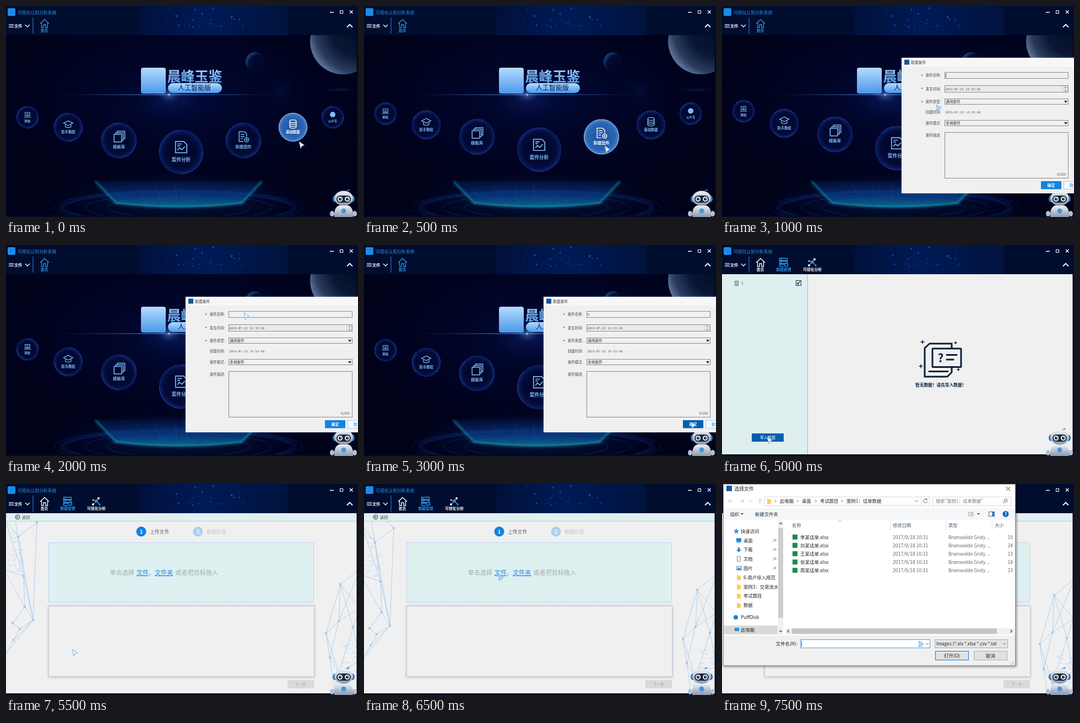
Write an HTML page that moves like this. It is 639 px wide and 383 px high and loops after 8 s.

```html
<!DOCTYPE html>
<html lang="zh-CN">
<head>
<meta charset="utf-8">
<title>可视化认知分析系统</title>
<style>
html, body { margin: 0; width: 100%; height: 100%; overflow: hidden; background: #000a22; }
svg { display: block; width: 639px; height: 383px; font-family: "Noto Sans CJK SC", "Noto Sans CJK", "Noto Sans", sans-serif; }
.mono { font-family: "Noto Sans Mono", "Liberation Mono", monospace; }
.a { animation: 8s step-end infinite; }
.home { animation-name: home; }
.work { animation-name: work; }
.data { animation-name: data; }
.upload { animation-name: upload; }
.case { animation-name: case; }
.files { animation-name: files; }
.hover0 { animation-name: hover0; }
.hover1 { animation-name: hover1; }
.bob { animation-name: bob; }
.caret { animation-name: caret; }
.typed { animation-name: typed; }
.okBtn { animation-name: okBtn; }
.importBtn { animation-name: importBtn; }
.cursor { animation-name: cursor; }
.arrow { animation-name: arrow; }
.busy { animation-name: busy; }
.spin { animation: spin 8s steps(16) infinite; }
.drift { animation: drift 8s steps(16) infinite; }
@keyframes home { 0% { opacity: 1 } 43.75%, 100% { opacity: 0 } }
@keyframes work { 0% { opacity: 0 } 43.75%, 100% { opacity: 1 } }
@keyframes data { 0% { opacity: 0 } 43.75% { opacity: 1 } 68.75%, 100% { opacity: 0 } }
@keyframes upload { 0% { opacity: 0 } 68.75%, 100% { opacity: 1 } }
@keyframes case {
  0% { opacity: 0; transform: none }
  12.5% { opacity: 1; transform: none }
  43.75% { opacity: .68; transform: translate(4px, 2px) scale(.993) }
  50%, 100% { opacity: 0; transform: none }
}
@keyframes files { 0% { opacity: 0 } 87.5%, 100% { opacity: 1 } }
@keyframes hover0 { 0% { opacity: 1 } 6.25%, 100% { opacity: 0 } }
@keyframes hover1 { 0% { opacity: 0 } 6.25% { opacity: 1 } 12.5%, 100% { opacity: 0 } }
@keyframes bob {
  0% { transform: none }
  6.25% { transform: translateY(calc(var(--a) * -.6)) }
  12.5% { transform: translateY(calc(var(--a) * -1)) }
  18.75% { transform: translateY(calc(var(--a) * -1.1)) }
  25% { transform: translateY(calc(var(--a) * -1.15)) }
  31.25% { transform: translateY(calc(var(--a) * -1.1)) }
  37.5%, 100% { transform: translateY(calc(var(--a) * -1)) }
}
@keyframes caret { 0% { opacity: 1 } 25%, 100% { opacity: 0 } }
@keyframes typed { 0% { opacity: 0 } 31.25%, 100% { opacity: 1 } }
@keyframes okBtn { 0% { fill: #1283e2 } 37.5% { fill: #0060b0 } 43.75%, 100% { fill: #0a72c0 } }
@keyframes importBtn { 0% { fill: #1283e2 } 56.25%, 100% { fill: #0060b0 } }
@keyframes spin { to { transform: rotate(360deg) } }
@keyframes drift { from { transform: translate(13px, -65px) } to { transform: translate(-3px, 15px) } }
@keyframes cursor {
  0% { transform: translate(532px, 246px) }
  6.25% { transform: translate(437px, 254px) }
  12.5% { transform: translate(388px, 179px) }
  18.75% { transform: translate(432px, 123px) }
  31.25% { transform: translate(617px, 299px) }
  37.5% { transform: translate(593px, 321px) }
  43.75% { transform: translate(597px, 308px) }
  50% { transform: translate(203px, 330px) }
  56.25% { transform: translate(80px, 346px) }
  62.5% { transform: translate(82px, 348px) }
  68.75% { transform: translate(120px, 300px) }
  75% { transform: translate(200px, 200px) }
  81.25% { transform: translate(243px, 164px) }
  87.5% { transform: translate(300px, 240px) }
  93.75%, 100% { transform: translate(356px, 285px) }
}
@keyframes arrow { 0% { opacity: 1 } 12.5% { opacity: 0 } 18.75% { opacity: 1 } 81.25%, 100% { opacity: 0 } }
@keyframes busy { 0% { opacity: 0 } 12.5% { opacity: 1 } 18.75% { opacity: 0 } 81.25%, 100% { opacity: 1 } }
</style>
</head>
<body>
<svg id="stage" viewBox="0 0 639 383"></svg>
<script>
const BLUE = '#1283e2', SKY = '#2a93e8', INK = '#0b2038', MINT = '#dff0f0';

const text = (x, y, size, str, fill, opt = '') =>
  `<text x="${x}" y="${y}" font-size="${size}" fill="${fill}" ${opt}>${str}</text>`;
const rect = (x, y, w, h, fill, opt = '') =>
  `<rect x="${x}" y="${y}" width="${w}" height="${h}" fill="${fill}" ${opt}/>`;
const box = (x, y, w, h, fill, stroke) =>
  rect(x + .5, y + .5, w - 1, h - 1, fill, `stroke="${stroke}"`);
const line = (d, stroke, width = 1, opt = '') =>
  `<path d="${d}" fill="none" stroke="${stroke}" stroke-width="${width}" ${opt}/>`;
const shape = (d, fill, opt = '') => `<path d="${d}" fill="${fill}" ${opt}/>`;
const dot = (x, y, r, fill, opt = '') => `<circle cx="${x}" cy="${y}" r="${r}" fill="${fill}" ${opt}/>`;
const oval = (x, y, rx, ry, fill, opt = '') =>
  `<ellipse cx="${x}" cy="${y}" rx="${rx}" ry="${ry}" fill="${fill}" ${opt}/>`;
const layer = (name, ...parts) => `<g class="a ${name}">${parts.join('')}</g>`;
const repeat = (n, make) => Array.from({ length: n }, (_, i) => make(i)).join('');
const MID = 'text-anchor="middle"', END = 'text-anchor="end"', BOLD = 'font-weight="700"';
const MID_BOLD = MID + ' ' + BOLD;

let seed = 11;
const rnd = () => (seed = seed * 16807 % 2147483647) / 2147483647;
const stops = list => list.map(([o, c, a = 1]) =>
  `<stop offset="${o}" stop-color="${c}" stop-opacity="${a}"/>`).join('');
const radial = (id, list, opt = '') => `<radialGradient id="${id}" ${opt}>${stops(list)}</radialGradient>`;
const linear = (id, list, down = true) =>
  `<linearGradient id="${id}" x2="${down ? 0 : 1}" y2="${down ? 1 : 0}">${stops(list)}</linearGradient>`;

const defs = `<defs>
${radial('space', [[0, '#020a3a'], [.4, '#010528'], [1, '#00021a']], 'cy=".35"')}
${radial('flare', [[0, '#fff'], [.08, '#8fc0ff', .9], [.3, '#2452c8', .4], [1, '#0a1e78', 0]])}
${radial('mist', [[0, '#0c3c90', .4], [1, '#08246c', 0]])}
${radial('ball', [[0, '#010526'], [.75, '#020a36'], [1, '#0a1c62']])}
${radial('lit', [[0, '#1c509c'], [.8, '#2c66b4'], [1, '#4a86cc']])}
${radial('moon', [[0, '#020a22'], [.55, '#0a1734'], [.85, '#2a3c5e'], [1, '#5a7096']], 'cx=".75" cy=".3" r=".8"')}
${radial('moonlet', [[0, '#01062a'], [.75, '#020c34'], [1, '#1c4880']], 'cx=".72" cy=".68" r=".72"')}
${linear('streak', [[0, '#1a4cb0', 0], [.5, '#7aaef0'], [1, '#1a4cb0', 0]], false)}
${linear('brand', [[0, '#b4dcff'], [1, '#4a98ea']])}
${linear('beam', [[0, '#08246c', .25], [.6, '#0a4a9c', .6], [1, '#0f86a4', .75]])}
${linear('band', [[0, '#00103a'], [.45, '#001a56'], [1, '#00133e']], false)}
${linear('shell', [[0, '#eef2f7'], [1, '#8a99ae']])}
<filter id="soft"><feGaussianBlur stdDeviation="2"/></filter>
<clipPath id="page"><rect y="53" width="637" height="327"/></clipPath>
<clipPath id="paper"><rect y="68" width="637" height="312"/></clipPath>
<clipPath id="tree"><rect width="101" height="280"/></clipPath>
</defs>`;

function header() {
  const circuit = repeat(20, () => {
    const x = 290 + rnd() * 140, y = 3 + rnd() * 40, len = 4 + rnd() * 10;
    return line(`M${x},${y}v${len}`, '#0a3c88', .4, 'opacity=".5"') + dot(x, y, .7 + rnd() * .9, '#1c70d0', 'opacity=".7"');
  });
  return rect(0, 0, 639, 53, '#000d2e') + rect(240, 0, 272, 53, 'url(#band)') + circuit +
    line('M321,36L347,20L376,37L404,36', '#0c3f88', .4) +
    rect(3, 4, 14, 14, '#1d8be4', 'rx="2"') + text(21, 14.5, 7.85, '可视化认知分析系统', SKY) +
    line('M5,33.5h9M5,36h9M5,38.5h9', '#fff') + text(15, 39, 7.2, '文件', '#fff', BOLD) +
    line('M35,34l4,4l4,-4', '#fff', 1.3) + line('M49,21V50', '#1d6fc0', 1.3) +
    line('M588,11.5h7M624,8l5.5,5.5m0,-5.5l-5.5,5.5', '#fff', 1.3) +
    box(606, 8, 6, 6, 'none', '#fff') + line('M619,38.5l5,-5l5,5', '#fff', 1.9);
}

const homeTab = color =>
  line('M62,32L70,24.5L78,32M64.5,30.5V39H68V34H72V39H75.5V30.5', color, 1.3) +
  text(69.5, 47, 6.8, '首页', color, MID_BOLD);

const workTabs = homeTab('#fff') +
  line('M104.5,24h14v4h-14zM104.5,29.5h14v4h-14zM112,39h-7.5v-4h8', SKY, 1.3) +
  line('M106,26h3M106,31.5h3', SKY) + dot(116.5, 36, 3, 'none', `stroke="${SKY}" stroke-width="1.6"`) +
  text(112, 47, 6.8, '数据管理', SKY, MID_BOLD) +
  line('M158,37L164,31L168,26M164,31L170,37M164,31L158,29', '#fff', .9) +
  dot(158, 37, 2, '#fff') + dot(168, 26, 2, '#fff') + dot(170, 37, 1.7, SKY) +
  dot(164, 31, 2.8, SKY) + dot(158, 29, 1.2, '#fff') +
  text(164, 47, 6.8, '可视化分析', '#fff', MID_BOLD);

const stack = 'M-9,-4H5V10H-9ZM-6,-4V-7H8V7H5M-3,-7V-10H11V4H8';
const drum = 'M-7,-6A7,3 0 0 1 7,-6A7,3 0 0 1 -7,-6V6A7,3 0 0 0 7,6V-6M-7,-2A7,3 0 0 0 7,-2M-7,2A7,3 0 0 0 7,2';
const balls = [
  [39, 202, 20, 11, '网校', 'M-6,-6H6V3H-6ZM-9,6H9M-3,-2H3M-3,1H3'],
  [113, 220, 26, 7, '新手教程', 'M0,-7L10,-2L0,3L-10,-2ZM-6,1V6Q0,9 6,6V1'],
  [205, 244, 32, 11, '模板库', stack],
  [318, 265, 40, 7, '案件分析', 'M-9,9V-9H4L9,-4V9ZM-6,5L-3,1L1,4L6,-1M-6,-5H1M-6,-2H-2'],
  [431, 244, 32, 11, '新建案件', 'M0,9H-8V-9H2L6,-5V0M-5,-4H2M-5,0H2M-5,4H-1M10,6A4,4 0 1 1 2,6A4,4 0 1 1 10,6M4,6H8M6,4V8', 'hover1'],
  [521, 220, 26, 7, '基础数据', drum, 'hover0'],
  [593, 202, 20, 11, '公众号', ''],
];

function ball([x, y, r, rise, name, icon, hover]) {
  const arc = (q, color, w) => line(`M${-q},0A${q},${q} 0 0 1 0,${-q}M${q},0A${q},${q} 0 0 1 0,${q}`, color, w);
  const face = color => (icon
    ? line(icon, color, 1.5, `transform="translate(0 ${-.22 * r}) scale(${.3 + r * .021})"`)
    : dot(0, -5, 5, color)) + text(0, .43 * r, 2.2 + r * .16, name, color, MID_BOLD);
  const lit = hover ? layer(hover, dot(0, 0, r - .5, 'url(#lit)', 'stroke="#a9c6ea"'), face('#fff')) : '';
  return `<g transform="translate(${x} ${y})"><g class="a bob" style="--a:${rise}px">` +
    dot(0, 0, r, 'url(#ball)', 'stroke="#10267a" stroke-width=".7"') +
    `<g class="spin" opacity=".55">${arc(r - .5, '#4a72d0', .7)}${arc(r - 3, '#1c3c98', .5)}</g>` +
    dot(0, 0, r - 2, 'none', 'stroke="#2444a0" stroke-dasharray=".6 2" opacity=".5"') +
    face('#7cbcf8') + lit + '</g></g>';
}

function stand() {
  const rays = repeat(26, i =>
    line(`M${204 + i * 8.8},362L${164 + i * 12},${322 + rnd() * 22}`, i % 3 ? '#1460c0' : '#17a09a', .7, 'opacity=".3"'));
  const rings = [225, 205, 170, 130].map((rx, i) =>
    oval(313, 366, rx, rx * .14, 'none', `stroke="#12388e" opacity="${.45 + i * .05}"`)).join('');
  return oval(313, 350, 225, 50, 'url(#mist)') + rings +
    oval(313, 366, 212, 29, 'none', 'stroke="#1238a0" stroke-width="4" opacity=".35" filter="url(#soft)"') +
    shape('M161,317H466L428,358Q313,372 200,358Z', 'url(#beam)') + rays +
    line('M163,319L200,358Q313,372 428,358L464,319', '#12a0b0', 3, 'filter="url(#soft)" opacity=".7"') +
    line('M161,317L200,358Q313,372 428,358L466,317', '#1c80c0', .7, 'opacity=".8"');
}

function home() {
  const stars = repeat(110, () =>
    dot(rnd() * 636, 55 + rnd() * 250, .3 + rnd() * .5, '#2c5cb8', `opacity="${.15 + rnd() * .5}"`));
  return homeTab(SKY) + '<g clip-path="url(#page)">' + rect(0, 53, 637, 327, 'url(#space)') + stars +
    oval(605, 152, 34, 4, 'url(#mist)') + dot(500, 152, 30, 'url(#mist)', 'opacity=".35"') +
    dot(612, 64, 60, 'url(#moon)') + dot(452, 101, 17, 'url(#moonlet)', 'opacity=".8"') + stand() +
    oval(296, 161, 70, 50, 'url(#flare)', 'opacity=".32"') + oval(296, 161, 230, .8, 'url(#streak)', 'opacity=".7"') +
    dot(296, 161, 10, 'url(#flare)') +
    rect(245, 112, 45, 47, 'url(#brand)', 'rx="4"') +
    text(292.5, 136.5, 25, '晨峰玉鉴', 'url(#brand)', 'font-weight="900"') +
    rect(294, 140, 98, 18, 'url(#brand)', 'rx="9"') + text(342, 153.3, 12, '人工智能版', '#041448', MID) +
    balls.map(ball).join('') + '</g>';
}

const page = workTabs + rect(0, 53, 637, 327, '#f0f0f0');
const plus = (x, y, s) => line(`M${x - s},${y}h${2 * s}M${x},${y - s}v${2 * s}`, INK, 1.5);

const dataPage = rect(0, 53, 155, 327, '#dfeff0') + line('M155.5,53V380', '#a3b6b8') +
  box(23, 65, 7, 9, '#cfdcdc', '#5c6870') + line('M25,68h3M25,70h3M25,72h3', '#5c6870', .7) +
  text(35, 71.5, 6.5, '8', '#777', 'class="mono"') +
  box(134, 64, 10, 10, 'none', '#17283c') + line('M142,66l-5,5M137,68v3h3', '#17283c', 1.2) +
  rect(54, 342, 58, 15, BLUE, 'class="a importBtn"') + text(83, 352.3, 7, '导入数据', '#fff', MID) +
  line('M417,187V179H377L368,187V239H409L417,231V222', INK, 3) +
  rect(382, 188, 52, 33.5, '#f0f0f0', `stroke="${INK}" stroke-width="3" rx="1"`) +
  text(397, 213, 21, '?', INK, MID_BOLD) +
  line('M408,199.5H426M408,208H420M376,229.5H410', INK, 3, 'stroke-linecap="round"') +
  plus(364, 176, 3.5) + plus(424, 177.5, 2.5) + plus(361, 220, 3.5) + plus(429, 226, 2.5) +
  text(351, 257.3, 7.7, '暂无数据！请先导入数据！', INK, BOLD);

function net(points, edges) {
  const wires = edges.map(([a, b]) => `M${points[a]}L${points[b]}`).join('');
  return line(wires, '#a9cdf0', .9) + points.map(([x, y]) => dot(x, y, 2.3, '#a4caf0')).join('');
}

function uploadPage() {
  const left = net([[-4, 74], [20, 106], [54, 80], [47, 257], [30, 177], [32, 233], [10, 262], [23, 273], [12, 293], [-5, 322], [-6, 165], [8, 40]],
    [[0, 1], [1, 2], [2, 3], [1, 3], [1, 4], [4, 3], [4, 5], [5, 3], [5, 6], [3, 7], [6, 7], [7, 8], [3, 8], [8, 9], [0, 4], [10, 4], [10, 5], [11, 2], [11, 1], [9, 3]]);
  const right = net([[605, 192], [602, 259], [579, 281], [628, 270], [642, 162], [640, 235], [586, 325], [602, 352], [640, 330], [594, 384]],
    [[0, 1], [0, 2], [0, 3], [0, 4], [4, 1], [0, 5], [1, 2], [1, 5], [3, 5], [2, 6], [1, 6], [3, 7], [6, 7], [3, 8], [7, 8], [2, 7], [6, 9], [7, 9]]);
  const dashes = repeat(70, () => {
    const side = rnd() < .6, x = side ? rnd() * 28 : 606 + rnd() * 30;
    return line(`M${x},${(side ? 95 : 290) + rnd() * 75}h${2 + rnd() * 6}`, '#c2dcf5', 1.2);
  });
  const link = (x, str) => text(x, 165, 11.1, str, '#2684e4', 'text-decoration="underline"');
  const step = (x, n, str, fill, ink) => dot(x, 86.3, 9, fill) +
    text(x, 89.7, 9.5, n, '#fff', MID_BOLD) + text(x + 15.5, 89.7, 8.8, str, ink);
  return rect(0, 53, 637, 327, '#f0f0f0') +
    `<g clip-path="url(#paper)"><g class="drift">${dashes}${left}${right}</g></g>` +
    rect(0, 53, 637, 14, MINT) + line('M0,67.5H637', '#b4cdea') +
    dot(21, 60, 4, 'none', 'stroke="#333"') + line('M23.5,60H19M21,58l-2,2l2,2', '#333', .9) + text(29, 62.8, 7.2, '返回', '#444') +
    step(245.5, 1, '上传文件', BLUE, '#666') + step(348.5, 2, '数据处理', '#abd1f3', '#c6c6c6') +
    rect(77.5, 106.5, 481, 108, MINT, 'stroke="#a5c8f8" stroke-dasharray="2 1"') +
    text(188.5, 165, 11.1, '单击选择', '#a2a8aa') + link(237, '文件') + text(259, 165, 11.1, '、', '#2684e4') +
    link(270, '文件夹') + text(307.5, 165, 11.1, '或者把目标拖入', '#a2a8aa') +
    rect(77, 221, 483, 130, '#9a9ac0', 'filter="url(#soft)" opacity=".6"') + box(77, 221, 483, 129, '#f0f0f0', '#c6c8d6') +
    rect(511, 356, 48, 15, '#dadada') + text(535, 366, 6.6, '下一步', '#a0a0a0', MID);
}

const robot = '<g>' + line('M616,338Q618,333 622,334', '#4a6a90') + dot(622, 334, 1.5, SKY) +
  oval(592, 377, 4, 5, '#b4c0d0') + oval(633, 377, 4, 5, '#b4c0d0') +
  shape('M596,383Q595,365 605,362H621Q631,365 630,383Z', 'url(#shell)') +
  oval(597, 350, 4, 6, '#2a78c0') + oval(629, 350, 4, 6, '#2a78c0') +
  oval(613, 349, 17, 13.5, 'url(#shell)') + rect(600, 344, 26, 13, '#1c2636', 'rx="6.5"') +
  [606.5, 619.5].map(x => dot(x, 350.5, 4.5, '#fff') + dot(x, 350.5, 2.7, '#16304c') + dot(x + .8, 349.7, .9, '#8fd0ff')).join('') +
  dot(613, 372, 4.5, '#4a94dc') + '</g>';

function caseDialog() {
  const label = (y, str, must) => text(397.5, y, 6.5, str + ':', '#444', END) +
    (must ? text(361, y + 1.5, 8, '*', '#e05018', BOLD) : '');
  const field = (y, h, fill = '#f0f0f0') => box(404, y, 225, h, fill, '#8a8a94');
  const combo = (y, str) => field(y, 11) + text(406, y + 8, 6.7, str, '#333') + shape(`M621,${y + 4}h6l-3,4z`, '#223');
  const date = y => text(405, y, 5.65, '2019-07-25 14:53:48', '#555', 'class="mono"');
  return rect(326, 94, 314, 246, '#8cc4f4', 'filter="url(#soft)" opacity=".3"') + rect(326, 94, 314, 246, '#f0f0f0') +
    rect(326, 94, 314, 16, '#f7f7f7') + rect(331, 97.5, 9, 9, '#14559c') + text(343, 105, 6.8, '新建案件', '#333') +
    label(128, '案件名称', 1) + field(120, 12) + line('M406.5,122v8', '#222', .8, 'class="a caret"') +
    text(405.5, 128.3, 6, '8', '#555', 'class="a typed mono"') +
    label(152.5, '发生时间', 1) + field(144, 13, '#eaeaea') + date(152.8) + box(618, 145, 10, 11, '#ededed', '#ccc') +
    shape('M621.5,149h4l-2,-2zM621.5,152.5h4l-2,2z', '#555') +
    label(176, '案件类型', 1) + combo(168, '通用案件') + label(195, '创建时间') + date(195) +
    label(215, '案件模式') + combo(207, '本地案件') + label(237, '案件描述') + field(229, 84) +
    text(624, 308, 6, '0/200', '#555', END) +
    rect(579, 318, 37, 14.5, BLUE, 'class="a okBtn"') + text(597.5, 328, 7, '确定', '#fff', MID_BOLD) +
    box(620, 318, 37, 15, '#f5f8fb', '#a8cdf0') + text(631, 328, 7, '取消', '#2a88dc');
}

function fileDialog() {
  const folder = (x, y) => shape(`M${x},${y - 4}h3l1,1h3v8h-7z`, '#f6cd62');
  const pin = y => line(`M92,${y + 3}l3,-3m-2,-2l4,4m-1,-5l3,3l-3,1z`, '#8a97a4', .9);
  const glyphs = [
    y => shape(`M26,${y - 5}l1.5,3.2l3.5,.4l-2.6,2.4l.7,3.5l-3.1,-1.8l-3.1,1.8l.7,-3.5l-2.6,-2.4l3.5,-.4z`, '#3a8fdc'),
    y => rect(26, y - 4, 9, 7, '#1e88dc') + rect(28, y + 3.5, 5, 1, '#1e88dc'),
    y => shape(`M29,${y - 4}h3v4h3l-4.5,5l-4.5,-5h3z`, '#2a80d0'),
    y => box(27, y - 5, 7, 10, '#eef4fa', '#8899aa'),
    y => box(26, y - 4, 10, 8, '#bfe0f6', '#8899aa') + shape(`M27,${y + 3}l3,-4l2,2l1,-1l2,3z`, '#3a78b0'),
  ];
  const tree = ['快速访问', '桌面', '下载', '文档', '图片', '6-用户导入规范', '案例3：交易流水', '考试题目', '数据'].map((str, i) => {
    const y = 85.5 + i * 16.8;
    return (glyphs[i] ? glyphs[i](y) : folder(27, y)) + text(i ? 39 : 34, y + 3.2, 8.4, str, '#222') + (i > 0 && i < 5 ? pin(y) : '');
  }).join('');
  const files = ['李', '刘', '王', '张', '周'].map((name, i) => {
    const y = 96.3 + i * 15.1;
    return rect(128, y - 4.5, 9, 9, '#1f8a50') + text(142, y + 3.2, 8.5, name + '某话单.xlsx', '#222') +
      text(310, y + 3.2, 8.7, '2017/9/18 10:31', '#666') + text(411, y + 3.2, 8.3, 'Bramwolde Gridy ...', '#666') +
      text(528, y + 3.2, 8.5, [19, 24, 13, 18, 23][i], '#666', END);
  }).join('');
  const head = [[127, '名称'], [310, '修改日期'], [411, '类型'], [495, '大小']].map(([x, s]) => text(x, 78, 8.4, s, '#4a5a70')).join('');
  const crumbs = [[105, '此电脑'], [145, '桌面'], [178, '考试题目'], [226, '案例1：话单数据']].map(([x, s]) =>
    line(`M${x - 9},28.5l2.5,2.5l-2.5,2.5`, '#666', .9) + text(x, 34.2, 8.4, s, '#222')).join('');
  const button = (x, w, str, edge) => box(x, 303, w, 17, '#e1e1e1', edge) + text(x + w / 2, 314.5, 8.5, str, '#222', MID);
  return rect(2, 1, 533, 331, '#000', 'filter="url(#soft)" opacity=".4"') + box(2, 0, 531, 330, '#fff', '#8f9398') +
    rect(8, 3, 10, 10, '#17589c') + text(22.5, 12, 8.8, '选择文件', '#222') + line('M516,5l7,7m0,-7l-7,7', '#333') +
    line('M19,31h-7m3,-3l-3,3l3,3M33,31h7m-3,-3l3,3l-3,3M69,35v-8m-3,3l3,-3l3,3M50,29.5l2.5,2.5l2.5,-2.5', '#b8b8b8') +
    box(77, 23, 300, 17, '#fff', '#d9d9d9') + folder(82, 31) + crumbs +
    line('M350,29.5l3,3l3,-3M372,28a3.6,3.6 0 1 0 1,3m-1,-5v2.5h-3', '#666', 1) + line('M361.5,23V40', '#d9d9d9') +
    box(382, 23, 143, 17, '#fff', '#d9d9d9') + text(388, 34.2, 8.2, '搜索"案例1：话单数据"', '#777') +
    dot(515, 30, 2.8, 'none', 'stroke="#666"') + line('M513,32l-3,3', '#666') +
    rect(3, 44, 529, 21, '#f5f6f7') + text(14.5, 57.5, 8.4, '组织', '#234') + shape('M34,53h5l-2.5,3zM463,53h5l-2.5,3z', '#444') +
    text(60, 57.5, 8.4, '新建文件夹', '#234') +
    line('M447,51.5h3m1,0h6M447,54.5h3m1,0h6M447,57.5h3m1,0h6', '#78909c') + box(484, 50, 11, 9, '#fff', '#567') + rect(490, 51, 4, 7, '#2a8ce0') +
    dot(515, 54.5, 5.5, '#0b66c0') + text(515, 58, 9, '?', '#fff', MID_BOLD) +
    line('M211,69l3,-2.5l3,2.5', '#888', .8) + line('M305.5,66V84M406.5,66V84M490.5,66V84', '#e0e0e0') + head + files +
    rect(3, 257, 98, 16, '#d9d9d9') + `<g clip-path="url(#tree)">${tree}</g>` +
    dot(25, 242, 4, '#1282d4') + text(34, 245.3, 8.6, 'PuffDisk', '#222') +
    rect(23, 261, 8, 6, '#2a90dc') + text(34, 268.2, 8.4, '此电脑', '#222') +
    rect(102, 66, 9, 208, '#f0f0f0') + rect(102, 80, 9, 163, '#cdcdcd') + rect(115, 262, 416, 11, '#f0f0f0') + rect(127, 262, 372, 10, '#c4c4c4') +
    line('M104,73l2.5,-2.5l2.5,2.5M104,266l2.5,2.5l2.5,-2.5M122,264.5l-3,2.5l3,2.5M523.5,264.5l3,2.5l-3,2.5', '#444', 1.2) +
    rect(3, 275, 529, 54, '#f0f0f0') + text(137, 293.3, 8.4, '文件名(N):', '#222', END) +
    box(142, 282, 236, 16, '#fff', '#5a9ad8') + line('M144.5,284.5v11', '#222', .8) +
    box(386, 282, 133, 16, '#e4e4e4', '#acacac') + text(389, 293.3, 8.3, 'Images (*.xls *.xlsx *.csv *.txt', '#222') +
    line('M370,289l2.5,2.5l2.5,-2.5M510,289l2.5,2.5l2.5,-2.5', '#555') +
    button(387, 61, '打开(O)', '#1878d0') + button(457, 61, '取消', '#adadad') +
    line('M530,322l-6,6M530,325l-3,3', '#aaa');
}

document.getElementById('stage').innerHTML = defs + header() +
  layer('home', home()) + layer('work', page) + layer('data', dataPage) + layer('upload', uploadPage()) +
  rect(636.5, 53, 3, 330, '#000a22') + rect(0, 380, 639, 3, '#000a22') + robot +
  layer('case', caseDialog()) + layer('files', fileDialog()) +
  layer('cursor',
    layer('arrow', '<path d="M0,0L9.5,6.5L5.5,8L3,12.5Z" fill="#eef6ff" stroke="#6aa6e4" stroke-width=".9"/>'),
    layer('busy', '<path d="M1,0L10,5L6.5,9.5L1,10.5L2.5,6Z" fill="#b4d8f6" stroke="#5c9fe0" stroke-width=".8"/>'));
</script>
</body>
</html>
```
